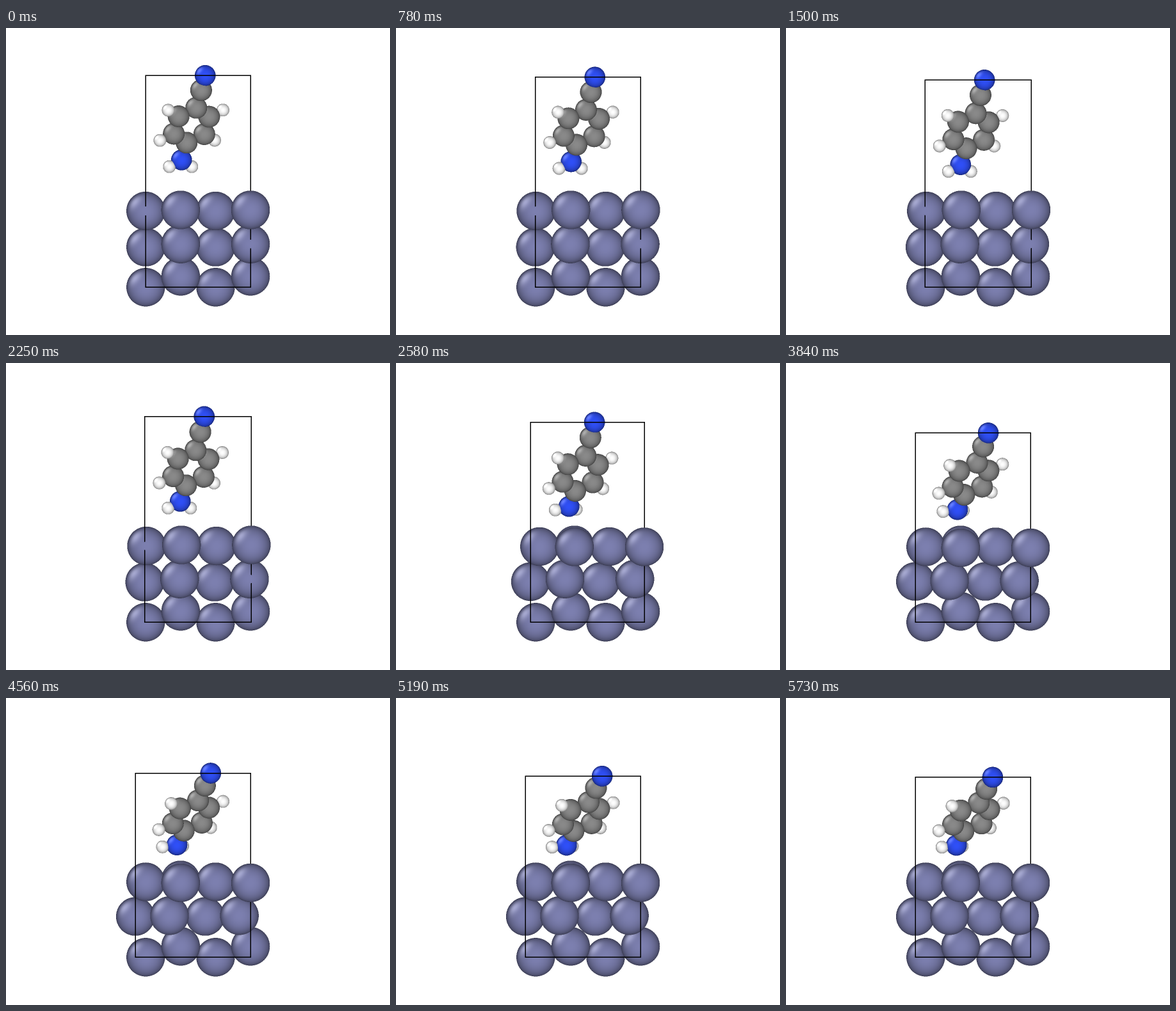
Write a matplotlib script that moves like this. It is 600 px wide and 480 px high and loops after 5.76 s.

```python
import numpy as np
import matplotlib.pyplot as plt
from matplotlib.animation import FuncAnimation

W, H, DPI = 600, 480, 100
FRAMES, STEP = 192, 30
SS = 2                                   # supersampling
X0, X1, Y0, Y1 = 160, 430, 40, 440       # part of the stage that is drawn

RADIUS = {"Zn": 30.2, "C": 17.0, "N": 16.3, "H": 10.0}
COLOUR = {"Zn": (125, 128, 176), "C": (138, 138, 138),
          "N": (48, 80, 248), "H": (255, 255, 255)}
RGB = {k: np.array(c, np.float32) / 255 for k, c in COLOUR.items()}
GLINT = np.array([-1.8, -1.5, -.2]) / np.linalg.norm([1.8, 1.5, .2])

PITCH = 54.6                             # distance between metal columns
LAYER_Z = 29.4                           # depth step of the metal lattice
AXIS = 62                                # ring length, head to base
AXIS_DOT_SPAN = 3429                     # rigid angle between ring vectors
LAYER_Y = [(405, 388), (342.3, 337.5), (285.8, 284.2)]


def progress(t, start, end):
    return min(max((t - start) / (end - start), 0), 1)


def smooth(u):
    return u * u * (3 - 2 * u)


def ease_out(u, power):
    return 1 - (1 - u) ** power


def phases(t):
    """Slow drift, quick drop, long lean, and the top layer's return."""
    drift = smooth(progress(t, 0, 2250))
    drop = ease_out(progress(t, 2250, 3030), 2)
    lean = ease_out(progress(t, 3030, 5730), 1.7)
    back = smooth(progress(t, 2700, 3840))
    return drift, drop, lean, back


def ring_sites():
    """Ring carbons and hydrogens as fractions of (axis, span)."""
    carbons = [(0, 0), (1, 0)]
    hydrogens = []
    for side in (-1, 1):
        for along in (0, .5 * (1 - side)):
            pass
        carbons += [(.5, .28 * side), (.5 - .5 * side, .28 * side)]
        hydrogens += [(.5, .5 * side), (.5 - .867 * side, .5 * side)]
    return ([("C", *c) for c in carbons] + [("H", *h) for h in hydrogens])


RING = ring_sites()


def molecule(t):
    drift, drop, lean, _ = phases(t)

    def move(start, by_drift, by_drop, by_lean):
        return (np.array(start) + drift * np.array(by_drift)
                + drop * np.array(by_drop) + lean * np.array(by_lean))

    base = move((282, 179), (-1, 12), (-2, 13), (-2, 4))
    head = move((297, 124.5), (-1, 11.5), (0, 13), (5, 14.5))
    tip = move((311, 74), (-1.5, 9.5), (.5, 13.5), (12.7, 26.7))
    amine = move((274, 206), (-2, 10), (-3, 12), (-3, 2))
    span = np.array((98.5, -47.5)) + lean * np.array((2.5, 4.5))
    axis = head - base

    axis_z = np.sqrt(max(AXIS ** 2 - axis @ axis, 1))
    span_z = (AXIS_DOT_SPAN - axis @ span) / axis_z
    depth = -110
    nz = depth - .5 * axis_z

    atoms = [(kind, *(base + a * axis + b * span),
              depth + a * axis_z + b * span_z) for kind, a, b in RING]
    atoms.append(("C", *(head + .545 * (tip - head)), depth + 1.5 * axis_z))
    atoms.append(("N", *tip, depth + 1.93 * axis_z))
    atoms.append(("N", *amine, nz))
    # the amine hydrogens swing round as the molecule drops
    x, y = amine
    atoms.append(("H", x - 19 - 3.5 * drop, y + 10.5 - 7.5 * drop, nz + 4))
    atoms.append(("H", x + 16 - 7 * drop, y + 10.5 - 9 * drop,
                  nz - 6 - 14 * drop))
    return atoms


def slab(t):
    drift, drop, _, back = phases(t)
    upper = 1.3 * drift + 7 * drop - 8.3 * back
    middle = -1.5 * drift - 10 * drop - 4.6 * back
    slip = [(0, 0), (middle, 1.08 * middle), (upper, upper)]
    sink = [(0, 0), (-drop, 2.5 * back), (1.4 * drop, 4.5 * drop)]

    atoms = []
    for layer in range(3):
        for col in range(4):
            odd = col % 2
            atoms.append(("Zn", 218 + PITCH * col + slip[layer][odd],
                          LAYER_Y[layer][odd] + sink[layer][odd],
                          LAYER_Z * (layer + odd - 3)))
    # neighbour one cell further back, uncovered when the front one sinks
    atoms.append(("Zn", 218 + PITCH + upper, LAYER_Y[2][1], -2 * LAYER_Z))
    return atoms


def draw_sphere(img, zbuf, kind, x, y, z):
    r = RADIUS[kind] * SS
    cx, cy = (x - X0) * SS, (y - Y0) * SS
    i0, i1 = int(cx - r), int(cx + r) + 2
    j0, j1 = int(cy - r), int(cy + r) + 2
    nx = (np.arange(i0, i1) - cx)[None, :] / r
    ny = (np.arange(j0, j1) - cy)[:, None] / r
    q = 1 - nx ** 2 - ny ** 2
    nz = np.sqrt(np.maximum(q, 0))
    surface = z + nz * RADIUS[kind]
    area = (slice(j0, j1), slice(i0, i1))
    seen = (q > 0) & (surface > zbuf[area])

    # headlight with ambient part, plus a soft glint at the upper left
    facing = nx * GLINT[0] + ny * GLINT[1] + nz * GLINT[2]
    glint = np.maximum(2 * facing * nz - GLINT[2], 0)[seen]
    glint = .25 * (glint * glint * glint) ** 2
    light = .4 + .6 * nz[seen]
    img[area][seen] = np.minimum(
        light[:, None] * RGB[kind] + glint[:, None], 1)
    zbuf[area][seen] = surface[seen]


def draw_box(img, zbuf, atoms):
    """Bounding box of the atom centres, at the depth of the nearest one."""
    xs, ys, zs = (np.array([a[k] for a in atoms]) for k in (1, 2, 3))

    def band(value, origin):
        start = int(round((value - origin) * SS)) - 1
        return slice(start, start + 3)

    left, right = band(xs.min(), X0), band(xs.max(), X0)
    top, bottom = band(ys.min(), Y0), band(ys.max(), Y0)
    edge = np.zeros(zbuf.shape, bool)
    for cols in (left, right):
        edge[top.start:bottom.stop, cols] = True
    for rows in (top, bottom):
        edge[rows, left.start:right.stop] = True
    img[edge & (zbuf <= zs.max())] = 0


def render(t):
    atoms = slab(t) + molecule(t)
    shape = ((Y1 - Y0) * SS, (X1 - X0) * SS)
    img = np.ones(shape + (3,), np.float32)
    zbuf = np.full(shape, -1e9)
    for atom in atoms:
        draw_sphere(img, zbuf, *atom)
    draw_box(img, zbuf, atoms)
    return img.reshape(Y1 - Y0, SS, X1 - X0, SS, 3).mean(axis=(1, 3))


fig = plt.figure(figsize=(W / DPI, H / DPI), dpi=DPI, facecolor="white")
ax = fig.add_axes([0, 0, 1, 1])
picture = ax.imshow(render(0), extent=(X0, X1, Y1, Y0),
                    interpolation="nearest", aspect="auto")
ax.set_xlim(0, W)
ax.set_ylim(H, 0)
ax.axis("off")


def update(i):
    picture.set_data(render(i * STEP))
    return [picture]


anim = FuncAnimation(fig, update, frames=FRAMES, interval=STEP,
                     repeat=True, repeat_delay=0, blit=False)
plt.show()
```
